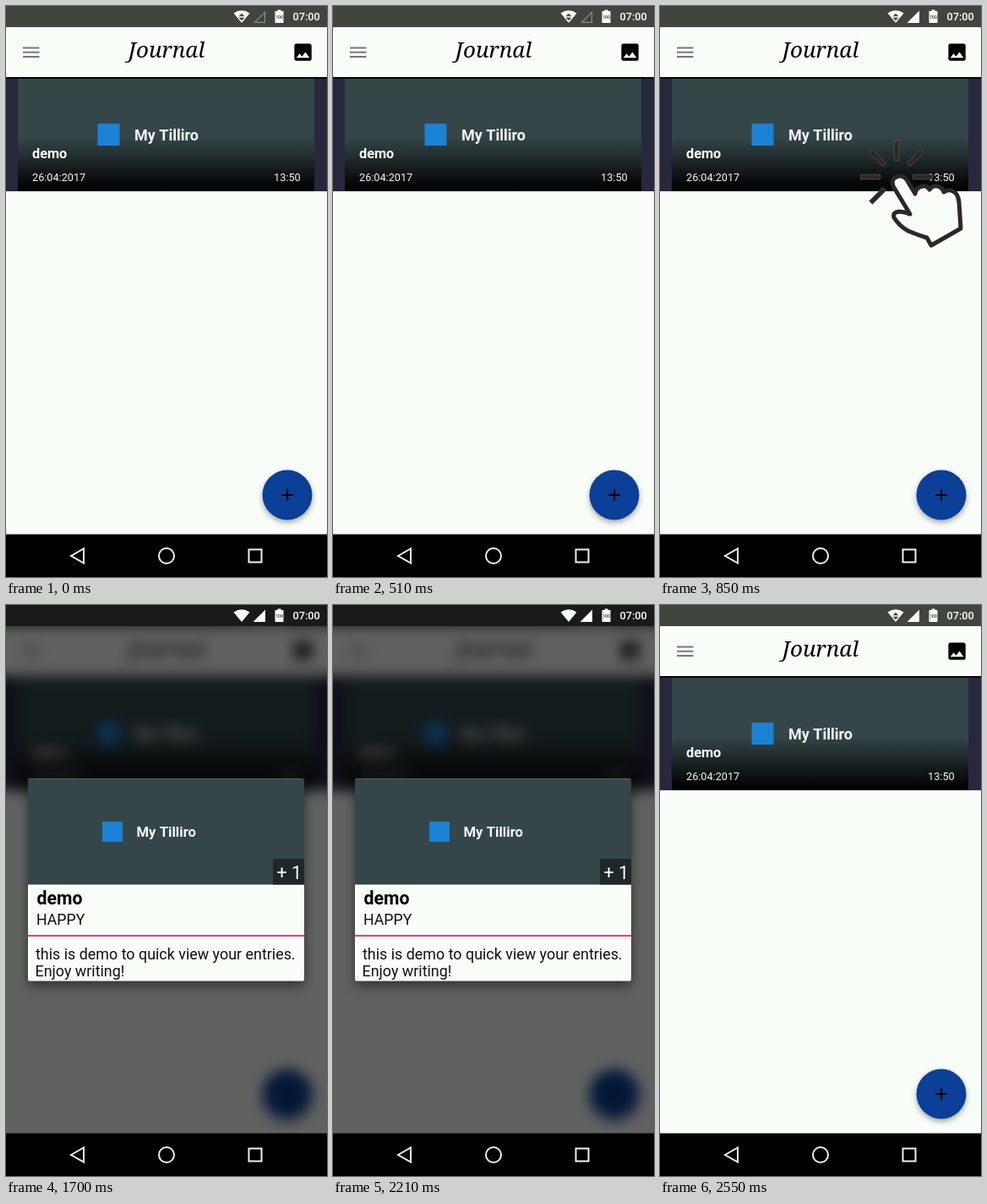
These frames come from a looping animation (380x675 px, 3400 ms). An HTML page with a canvas:

```html
<!DOCTYPE html>
<html lang="en">
<head>
<meta charset="utf-8">
<title>Journal quick view</title>
<style>
html, body { margin: 0; width: 100%; height: 100%; overflow: hidden; background: #000; }
canvas { display: block; width: 380px; height: 675px; }
</style>
</head>
<body>
<canvas id="stage" width="380" height="675"></canvas>
<script>
const W = 380, H = 675, PAD = 40, STEP = 850;
const PAPER = '#f8fdf8', SLATE = '#344648', BLUE = '#1b82d6', INK = '#2b2826';
const stage = document.getElementById('stage').getContext('2d');
let ctx = stage;

function rect(x, y, w, h, fill) {
  ctx.fillStyle = fill;
  ctx.fillRect(x, y, w, h);
}

function circle(x, y, r) {
  ctx.beginPath();
  ctx.arc(x, y, r, 0, Math.PI * 2);
}

function shape(d, fill, stroke, width = 2) {
  const path = new Path2D(d);
  if (fill) { ctx.fillStyle = fill; ctx.fill(path); }
  if (stroke) { ctx.strokeStyle = stroke; ctx.lineWidth = width; ctx.stroke(path); }
}

function text(str, x, y, size, fill, weight = 400, align = 'left') {
  ctx.font = `${weight} ${size}px Roboto, sans-serif`;
  ctx.textAlign = align;
  ctx.fillStyle = fill;
  ctx.fillText(str, x, y);
}

function withShadow(blur, dy, alpha, draw) {
  ctx.save();
  ctx.shadowColor = `rgba(0,0,0,${alpha})`;
  ctx.shadowBlur = blur;
  ctx.shadowOffsetY = dy;
  draw();
  ctx.restore();
}

function statusBar(bg, arrows, signal) {
  rect(-PAD, -PAD, W + 2 * PAD, 25 + PAD, bg);
  shape('M269.5 8.5Q279 2 288.5 8.5L279 20Z', '#fff');
  if (arrows) shape('M275.5 12.3L279 8.8L282.5 12.3ZM275.5 13.7H282.5L279 17.2Z', bg);
  if (signal) shape('M292.5 20H307V5.5Z', '#fff');
  else shape('M294.5 19.3H306.4V7.4Z', null, '#8b8f88', 1.2);
  shape('M321.5 4.5h4v1.5h3v14h-10v-14h3z', '#fff');
  text('100', 323.5, 15, 5, '#40463e', 700, 'center');
  text('07:00', 339.5, 17, 12.7, '#fff', 500);
}

function header() {
  rect(-PAD, 25, W + 2 * PAD, 59, PAPER);
  rect(-PAD, 84, W + 2 * PAD, 2, '#050605');
  for (const y of [48.5, 53.7, 59]) rect(20, y, 19.5, 2, '#747974');
  ctx.font = 'italic 400 26px "Noto Serif", serif';
  ctx.textAlign = 'center';
  ctx.fillStyle = '#000';
  ctx.fillText('Journal', 190, 61);
  ctx.save();
  ctx.translate(338, 41);
  ctx.scale(1.13, 1.13);
  shape('M21 19V5c0-1.1-.9-2-2-2H5c-1.1 0-2 .9-2 2v14c0 1.1.9 2 2 2h14c1.1 0 2-.9 2-2z', '#000');
  shape('M8.5 13.5l2.5 3L14.5 12l4.5 6H5z', PAPER);
  ctx.restore();
}

function entryCard() {
  rect(-PAD, 86, W + 2 * PAD, 133, '#27273d');
  rect(14, 86, 351, 133, SLATE);
  const shade = ctx.createLinearGradient(0, 155, 0, 217);
  shade.addColorStop(0, 'rgba(0,0,0,0)');
  shade.addColorStop(1, '#000');
  rect(14, 155, 351, 64, shade);
  rect(108.5, 139, 26, 26, BLUE);
  text('My Tilliro', 152, 158.5, 18, '#f4f8f5', 700);
  text('demo', 31, 180, 16.3, '#fff', 700);
  text('26:04:2017', 31, 207, 12.7, '#f4f6f4');
  text('13:50', 348.7, 207, 12.7, '#f4f6f4', 400, 'right');
}

function addButton() {
  withShadow(6, 3, 0.35, () => {
    ctx.fillStyle = '#0b3f98';
    circle(333, 578, 29.5);
    ctx.fill();
  });
  rect(326.3, 577, 13.6, 2, '#000');
  rect(332.1, 571.2, 2, 13.6, '#000');
}

function navBar() {
  rect(0, 624.5, W, H - 624, '#000');
  shape('M77 650L92 641.5V658.5Z', null, '#eef0ee');
  shape('M287.5 642.5h15v15h-15z', null, '#eef0ee');
  circle(190, 650, 9);
  ctx.stroke();
}

function home(signal) {
  rect(-PAD, -PAD, W + 2 * PAD, H + 2 * PAD, PAPER);
  statusBar('#40463e', true, signal);
  header();
  entryCard();
  addButton();
}

function tapHand() {
  for (let turn = 3; turn <= 8; turn++) {
    const slanted = turn % 2;
    ctx.save();
    ctx.translate(280, 202);
    ctx.rotate(turn * Math.PI / 4);
    shape(`M${slanted ? 20 : 19.5} -2.7h23v5.4h-23z`, INK, '#5d5955', 0.8);
    ctx.restore();
  }
  ctx.lineJoin = 'round';
  shape('M276 213Q273 204 281 201.500Q289 199.500 293 207L302 222Q303 214 311 213' +
    'Q316 212 319 217Q322 212 328 213Q334 214 336 220Q341 216 347 219Q353 222 354 232' +
    'L356 263L321 283L316 274Q306 271 294 266Q283 260 277 250Q275 244 283 243' +
    'Q289 243 296 246Z', PAPER, INK, 5);
  ctx.lineJoin = 'miter';
}

// Home screen with spare margin, so that its blur has no faded edges.
const backdrop = document.createElement('canvas');
backdrop.width = W + 2 * PAD;
backdrop.height = H + 2 * PAD;

function paintBackdrop() {
  ctx = backdrop.getContext('2d');
  ctx.setTransform(1, 0, 0, 1, PAD, PAD);
  home(true);
  ctx = stage;
}

function quickView() {
  paintBackdrop();
  ctx.save();
  ctx.filter = 'blur(8px)';
  ctx.drawImage(backdrop, -PAD, -PAD);
  ctx.restore();
  rect(0, 0, W, H, 'rgba(0,0,0,.61)');
  statusBar('#191b18', false, true);

  withShadow(14, 6, 0.5, () => {
    ctx.fillStyle = PAPER;
    ctx.beginPath();
    ctx.roundRect(26, 205.5, 327, 239, 2);
    ctx.fill();
  });
  rect(26, 205.5, 327, 125, SLATE);
  rect(114, 256, 24, 24, BLUE);
  text('My Tilliro', 154.5, 273.5, 16.7, '#f4f8f5', 700);
  rect(316, 300, 37, 30.5, '#1e2829');
  text('+ 1', 320.5, 324, 21.5, '#fff');
  text('demo', 36.5, 354, 21.3, '#000', 700);
  text('HAPPY', 36, 378, 17.7, '#111');
  rect(26, 390, 327, 2, '#e5446f');
  text('this is demo to quick view your entries.', 35, 418.5, 17.9, '#111');
  text('Enjoy writing!', 34.5, 439, 17.9, '#111');
}

function render(time) {
  const scene = Math.floor(time / STEP) % 4;
  if (scene === 2) quickView();
  else home(scene > 0);
  if (scene === 1) tapHand();
  navBar();
}

const start = performance.now();
function tick() {
  render(performance.now() - start);
  requestAnimationFrame(tick);
}
tick();
</script>
</body>
</html>
```
